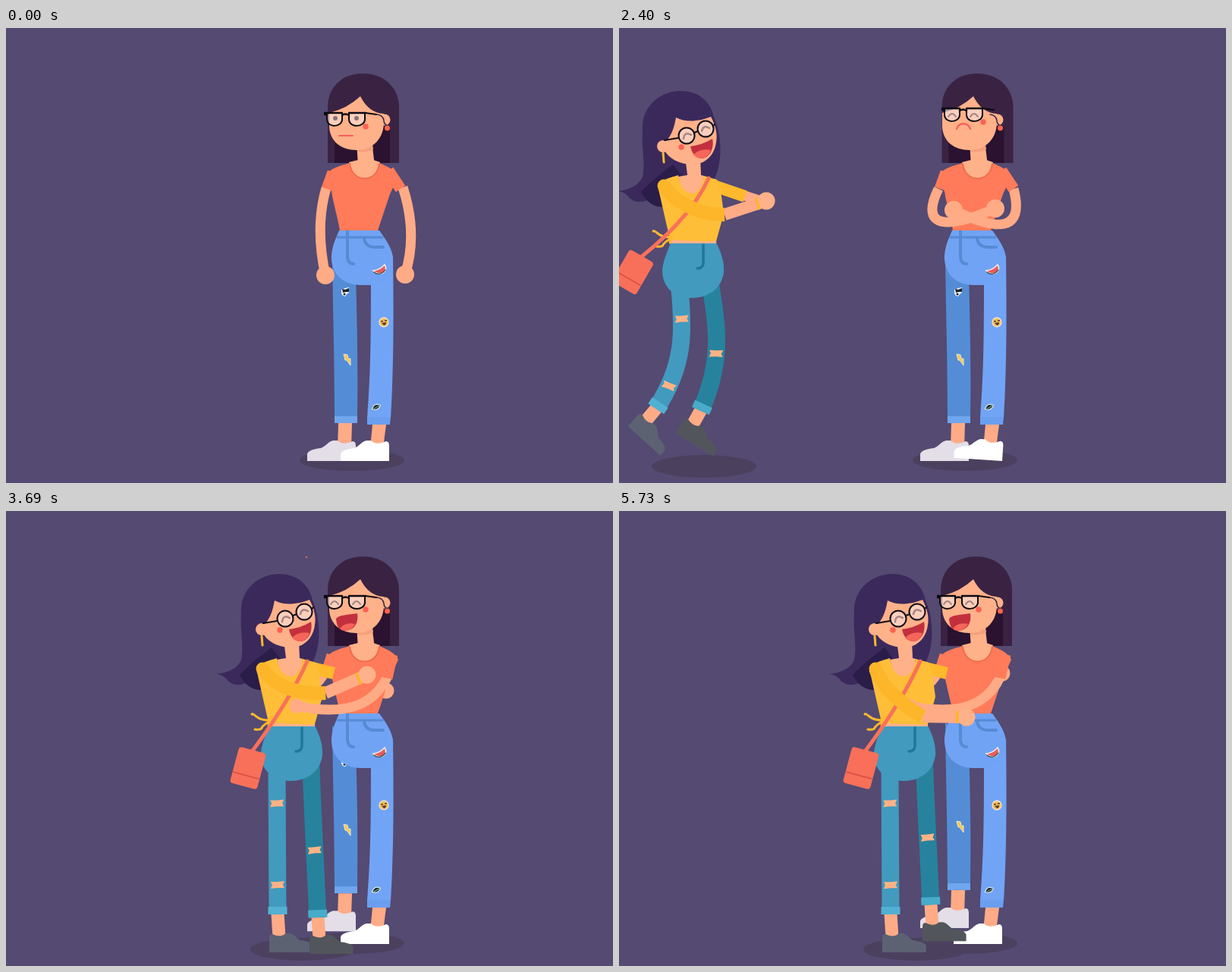
These frames come from a looping animation (800 by 600 pixels, 5760 ms). An HTML page:

```html
<!DOCTYPE html>
<html lang="en">
<head>
<meta charset="utf-8">
<title>Hug</title>
<style>
html,body{margin:0;width:100%;height:100%;overflow:hidden;background:#544a72}
svg{display:block;width:100vw;height:100vh}
.skin{fill:#ffb189}
.line{fill:none;stroke-linecap:round;stroke-linejoin:round}
.limb{fill:none;stroke:#ffab86}
</style>
</head>
<body>
<svg viewBox="0 0 800 600" preserveAspectRatio="none">
<defs>
  <path id="shoe" d="M-64 0V-9Q-63-15-46-17C-40-19-36-26-30-27H-24Q-17-20-4-26Q0-26 0-20V0Z"/>
  <path id="rip" fill="#ffb285" d="M-9-4L0-4 9-5 7 0 9 4 0 4-9 5-7 0Z"/>
  <path id="heart" fill="#ff7458" d="M0 5C-8-1-5-6-2-5Q0-4 0-2Q0-4 2-5C5-6 8-1 0 5Z"/>
</defs>
<rect width="800" height="600" fill="#544a72"/>
<ellipse cx="456" cy="570" rx="69" ry="14" fill="#4c405f"/>
<ellipse id="shadow" cx="391" cy="578" rx="69" ry="15" fill="#4c405f"/>
<circle id="farHand" r="10.5" fill="#ffab86"/>

<g id="tall">
  <g id="tallHair">
    <path fill="#3a2342" d="M424 178V105C424 76 445 60 470 60C500 60 518 80 518 105V178Z"/>
    <path fill="#2a1230" d="M433 130H506V178H433Z"/>
  </g>
  <path class="skin" d="M462 150L464 182H486L482 148Z"/>
  <g id="tallLegL">
    <path fill="#548dd6" d="M430 300L461 325C463 400 464 450 463 514H433C433 440 431 380 430 300Z"/>
    <path fill="#70a6ee" d="M433 512H463V521H433Z"/>
    <path fill="#ffab86" d="M438 521H456L455 553H437Z"/>
    <use href="#shoe" x="461" y="571" fill="#e3dee8"/>
    <g transform="translate(447 348)">
      <path fill="#f4f6f6" d="M-5-3L0-5 5-6 5 1 2 3 0 6-3 5-5 2Z"/>
      <path fill="#1d2530" d="M-4-4L0-3 5-5 5 0 1 0-3 1Z"/><circle cx="-1" cy="3" r="1.5" fill="#1d2530"/>
    </g>
    <path transform="translate(450 437)" fill="#f6c84f" stroke="#efe6d2" stroke-width="1" d="M-5-7L0-6 1-1 4-1 4 8-1 1-3 1Z"/>
  </g>
  <g id="tallLegR">
    <path fill="#72a4f6" d="M481 325C481 400 481 450 476 514H507C511 450 511 380 510 300Z"/>
    <path fill="#6a9ff0" d="M476 513H507L506 523H476Z"/>
    <path fill="#ffab86" d="M483 523H501L497 554H480Z"/>
    <use id="tapShoe" href="#shoe" fill="#fff"/>
    <circle cx="498" cy="388" r="6" fill="#f4bc55" stroke="#f2e4cc" stroke-width="1.3"/>
    <path fill="#5c3a2c" d="M494 386h3v1.500h-3zM499 385h3v1.500h-3zM495 389l6-1q0 4-3 4z"/>
    <path transform="translate(488 500) rotate(-25)" fill="#16242f" stroke="#dfe8e4" stroke-width="1.2" d="M-6 0Q0-7 6 0Q0 6-6 0Z"/>
    <path class="line" stroke="#6f9d7a" stroke-width="1.2" d="M485 502L492 498"/>
  </g>
  <path fill="#71a3f5" d="M439 267H492C505 285 511 295 510 310C509 325 503 338 480 339H466C440 338 428 320 429 300C430 285 436 275 439 267Z"/>
  <g class="line" stroke="#558bd3">
    <path stroke-width="3" d="M437 276H496"/>
    <path stroke-width="4" d="M450 268V300Q450 311 458 311M472 278Q474 289 486 289H497"/>
  </g>
  <path fill="#e75b5d" stroke="#f3ece4" stroke-width="1.5" d="M484 320Q493 319 499 312Q503 318 497 323Q490 326 484 320Z"/>
  <path class="line" stroke="#31403c" stroke-width="1.2" d="M485 322Q493 328 500 319"/>
  <path class="skin" d="M452 177L464 174H484L493 177Q492 204 472 204Q452 203 452 177Z"/>
  <path fill="#ff7b59" d="M453 178C440 182 428 184 421 195C425 205 430 215 430 222C434 240 438 255 440 267H490L505 222C508 213 511 210 517 196C512 186 503 183 492 178C490 205 455 205 453 178Z"/>
  <path class="line" stroke="#ee6c4d" stroke-width="2" d="M453 179C456 205 489 205 492 179"/>
  <path id="tallArmL" class="limb" stroke-width="13"/>
  <circle id="tallHandL" r="12" fill="#ffab86"/>
  <path id="tallSleeveL" fill="none" stroke="#ff7b59" stroke-width="15"/>
  <path fill="#f5a07c" d="M463 158L483 153 484 160Q474 165 463 163Z"/>
  <path class="skin" d="M426 112V130C427 150 442 161 462 161C484 161 498 145 498 124V113Q478 112 467 90Q450 106 426 112Z"/>
  <circle cx="499" cy="121" r="7.500" class="skin"/>
  <path class="line" stroke="#3a2342" stroke-width="1.500" d="M489 114Q497 115 498 122Q498 127 503 129"/>
  <circle cx="502.500" cy="132" r="3.500" fill="#f8634b"/>
  <g id="tallFace">
    <g fill="#f8e6e2" fill-opacity=".58" stroke="#0c0a10" stroke-width="2">
      <path d="M423 112H443V121C442 131 424 132 423 121Z"/>
      <path d="M452 112H473V121C472 131 453 132 452 121Z"/>
    </g>
    <path class="line" stroke="#0c0a10" stroke-width="2.500" d="M420 112H443M452 112H474M443 115Q447 112 452 115M420 114H423"/>
    <path class="line" stroke="#0c0a10" stroke-width="2" d="M474 112L488 114"/>
    <g id="dots" fill="#8a7576"><circle cx="434" cy="119" r="3"/><circle cx="462" cy="119" r="3"/></g>
    <path id="arcs" class="line" stroke="#a98584" stroke-width="2" d="M428 123Q433 115 438 123M457 123Q462 115 467 123"/>
    <circle cx="474" cy="130" r="3.700" fill="#fa6254"/>
    <path id="flat" class="line" stroke="#f4605c" stroke-width="2" d="M439 142H457"/>
    <path id="frown" class="line" stroke="#f4605c" stroke-width="2.300" d="M439 139C442 130 454 130 457 139"/>
    <g id="smile">
      <path fill="#c2303d" d="M435 142Q436 140 442 138Q454 136 463 135C465 148 459 157 447 158Q436 158 435 142Z"/>
      <path fill="#f5655a" d="M440 155Q447 146 460 149Q456 157 447 158Q443 158 440 155Z"/>
    </g>
  </g>
</g>

<g id="short">
  <path fill="#3b295c" d="M310 135C308 102 335 83 360 83C385 83 400 98 404 118C414 140 416 175 405 198L345 230C340 238 325 236 318 226C304 233 294 227 290 221Q285 216 278 215C292 213 306 208 310 196C314 180 308 155 310 135Z"/>
  <path fill="#2b1d49" d="M350 180Q325 198 308 216Q318 236 336 236L365 200Z"/>
  <g id="legL"></g>
  <g id="legR"></g>
  <path fill="#429abf" d="M347 283H407C414 297 418 310 417 322C414 345 395 356 375 356C350 356 335 340 336 318C338 303 343 295 347 283Z"/>
  <path class="line" stroke="#1f789b" stroke-width="3.500" d="M390 286V309Q390 317 382 317"/>
  <path id="reach" class="limb" stroke-width="13"/>
  <path id="farSleeve" fill="none" stroke="#ffb92c" stroke-width="16"/>
  <path class="skin" d="M366 170L369 194 357 196Q362 222 376 222Q390 221 391 195L387 194 386 172ZM348 276H407V284H347Z"/>
  <path fill="#ffbe38" d="M357 194C345 198 330 200 331 213L346 279Q378 282 407 281L417 245 413 215 408 200 391 195C388 226 361 226 357 194Z"/>
  <path class="line" stroke="#ffb92c" stroke-width="3" d="M348 276Q336 276 330 271T324 268M348 277Q338 283 337 286T328 288M349 272L346 283"/>
  <path class="skin" d="M338 151L343 147C350 138 352 128 354 118C368 126 388 122 400 117C406 128 409 140 407 150C405 168 392 180 376 180C358 180 344 172 338 160Z"/>
  <circle cx="337" cy="156" r="8" class="skin"/>
  <path class="line" stroke="#fbb930" stroke-width="3" d="M337 165L338 177"/>
  <g fill="#f8e6e2" fill-opacity=".58" stroke="#120d18" stroke-width="2"><circle cx="368" cy="142" r="10.500"/><circle cx="393" cy="133" r="10.500"/></g>
  <path class="line" stroke="#120d18" stroke-width="2" d="M339 148L357 145M378 138L383 136M403 129L405 127"/>
  <path class="line" stroke="#a98584" stroke-width="2.500" d="M364 146Q365 136 374 141M388 136Q390 127 398 132"/>
  <circle cx="361" cy="157" r="3.700" fill="#fa6254"/>
  <path fill="#c2303d" d="M373 156Q389 154 402 146C405 160 397 172 388 172Q376 171 373 156Z"/>
  <path fill="#f5655a" d="M377 167Q386 158 400 161Q396 172 388 172Q381 172 377 167Z"/>
</g>

<g id="hugArm">
  <path id="tallArmR" class="limb" stroke-width="13"/>
  <circle id="tallHandR" fill="#ffab86"/>
  <path id="tallSleeveR" fill="none" stroke="#ff7b59"/>
</g>

<g id="near">
  <path id="strap" class="line" stroke="#f9705a" stroke-width="5"/>
  <path id="forearm" class="limb" stroke-width="16"/>
  <circle id="nearHand" r="11.500" fill="#ffb189"/>
  <path id="bracelet" fill="none" stroke="#fdb52a" stroke-width="16"/>
  <path id="sleeve" fill="none" stroke="#fdb52a" stroke-width="18"/>
  <circle cx="338" cy="208" r="8.500" fill="#fdb52a"/>
  <g id="bag">
    <rect x="-18.500" y="-24.500" width="37" height="49" rx="4" fill="#f9705a"/>
    <path stroke="#dd5449" stroke-width="2" d="M-18 10H18"/>
  </g>
</g>
<g id="hearts"></g>
</svg>
<script>
const LOOP = 5760, STOMP = 540, TAU = Math.PI * 2;
const $ = id => document.getElementById(id);
const set = (id, attrs) => { for (const k in attrs) $(id).setAttribute(k, attrs[k]); };
const show = (id, on) => set(id, { visibility: on ? 'visible' : 'hidden' });
const clamp = v => Math.max(0, Math.min(1, v));
const ease = (t, from, to) => { const u = clamp((t - from) / (to - from)); return u * u * (3 - 2 * u); };
const mix = (a, b, k) => a.map((v, i) => v + (b[i] - v) * k);
const line = p => `M${p[0]} ${p[1]}L${p[2]} ${p[3]}`;
const cubic = p => `M${p[0]} ${p[1]}C${p.slice(2, 8).join(' ')}`;
const move = (id, x, y) => set(id, { transform: `translate(${x} ${y})` });
const place = (id, x, y) => set(id, { cx: x, cy: y });

// Arms: shoulder, two control points, hand
const ARM_L = {
  down: [422, 211, 412, 245, 412, 285, 421, 326],
  wide: [420, 211, 402, 240, 400, 280, 412, 318],
  crossed: [421, 212, 400, 255, 418, 272, 496, 238],
  hug: [424, 205, 415, 225, 405, 235, 385, 236]
};
const ARM_R = {
  down: [523, 210, 536, 250, 537, 290, 526, 325],
  wide: [525, 210, 544, 245, 546, 285, 534, 318],
  crossed: [520, 212, 530, 250, 522, 280, 441, 240],
  hug: [503, 218, 484, 258, 446, 270, 383, 257]
};
// Near arm: sleeve curve followed by the hand
const HOLD_HIGH = [338, 208, 350, 227, 380, 243, 421, 240, 476, 216];
const HOLD_LOW = [338, 208, 345, 230, 372, 255, 400, 271, 458, 272];
const REACH = [338, 208, 350, 227, 382, 247, 418, 246, 473, 228];

// Legs: hip, two control points, cuff, ankle, foot angle
const STAND_L = [357, 340, 357, 400, 358, 460, 358, 532, 360, 562, 0];
const STAND_R = [402, 335, 404, 400, 408, 470, 411, 536, 413, 564, 0];
const BACK = [358, 340, 359, 410, 347, 455, 294, 497, 274, 509, 62];
const FRONT = [400, 340, 415, 388, 433, 432, 420, 510, 415, 534, 12];
const shift = (p, dx) => p.map((v, i) => i < 10 && i % 2 === 0 ? v + dx : v);

function buildLeg(id, color, cuff, shoe, rips) {
  $(id).innerHTML = `<path class="limb" stroke-width="17"/>
    <use href="#shoe" fill="${shoe}"/>
    <path fill="none" stroke="${color}" stroke-width="23"/>
    <path fill="none" stroke="${cuff}" stroke-width="25"/>` + '<use href="#rip"/>'.repeat(rips.length);
  const [ankle, foot, leg, hem, ...holes] = $(id).children;
  return (p, lift) => {
    const [x0, y0, x1, y1, x2, y2, x, y, ax, ay, turn] = p;
    const len = Math.hypot(x - x2, y - y2), dx = (x - x2) / len, dy = (y - y2) / len;
    leg.setAttribute('d', cubic(p));
    hem.setAttribute('d', line([x - 10 * dx, y - 10 * dy, x, y]));
    ankle.setAttribute('d', line([x - dx, y - dy, ax, ay]));
    foot.setAttribute('transform', `translate(${ax} ${ay}) rotate(${turn}) translate(-13 20) scale(-.9 .93)`);
    rips.forEach((u, i) => {
      const v = 1 - u, at = (a, b, c, d) => v * v * v * a + 3 * v * v * u * b + 3 * v * u * u * c + u * u * u * d;
      const slope = (a, b, c, d) => v * v * (b - a) + 2 * v * u * (c - b) + u * u * (d - c);
      const angle = Math.atan2(-slope(x0, x1, x2, x), slope(y0, y1, y2, y)) * 360 / TAU;
      holes[i].setAttribute('transform',
        `translate(${at(x0, x1, x2, x)} ${at(y0, y1, y2, y)}) rotate(${angle})`);
    });
    move(id, 0, -lift);
  };
}
const drawLegL = buildLeg('legL', '#429abf', '#52b1d3', '#5c6272', [.252, .815]);
const drawLegR = buildLeg('legR', '#27839d', '#48abc9', '#52565c', [.56]);

// Hearts: birth time, x drift, size
const HEARTS = [[3650, -7, .8], [3790, -2, .9], [3915, 13, 1.1], [4105, -9, .75]];
$('hearts').innerHTML = '<use href="#heart"/>'.repeat(HEARTS.length);

function drawHearts(t) {
  HEARTS.forEach(([birth, drift, size], i) => {
    const age = t - birth, heart = $('hearts').children[i];
    const scale = size * clamp(age / 140) * clamp((700 - age) / 80);
    const x = 398 + drift * clamp(age / 150);
    heart.setAttribute('transform', `translate(${x} ${64 - age * .072}) scale(${age < 0 ? 0 : scale})`);
  });
}

function drawTall(t, bob, stomp, beat) {
  const wide = ease(t, 120, 380), cross = ease(t, 420, 900), hug = ease(t, 2980, 3420);
  const arm = a => mix(mix(mix(a.down, a.wide, wide), a.crossed, cross), a.hug, hug);
  const left = arm(ARM_L), right = arm(ARM_R);
  set('tallArmL', { d: cubic(left) });
  set('tallArmR', { d: cubic(right) });
  place('tallHandL', left[6], left[7]);
  place('tallHandR', right[6], right[7]);
  set('tallHandR', { r: 12 - 2.5 * hug });
  set('tallSleeveL', { d: line(mix([431, 190, 423, 212], [430, 190, 425, 206], hug)) });
  set('tallSleeveR', { d: line(mix([504, 188, 520, 212], [508, 189, 501, 220], hug)), 'stroke-width': 15 + 2 * hug });

  const look = ease(t, 450, 850) - .25 * ease(t, 2450, 2700) - .75 * ease(t, 2950, 3200);
  move('tallFace', 6 * look, -6 * look);
  move('tallHair', 1.5 * look, 0);
  const mad = t >= 600 && t < 3120, glad = t >= 3120;
  show('dots', !mad && !glad);
  show('flat', !mad && !glad);
  show('arcs', mad || glad);
  show('frown', mad);
  show('smile', glad);

  const tapping = ease(t, 700, 850) * (1 - ease(t, 2950, 3100));
  const tap = 7 * tapping * (.5 + .5 * Math.cos(TAU * (t - 1440) / 430));
  set('tapShoe', { transform: `translate(505 571) rotate(${tap})` });
  move('tallLegL', 0, -25 * stomp * Math.max(0, Math.cos(TAU * (beat - .87))));
  move('tallLegR', 0, -13 * stomp * Math.max(0, Math.sin(TAU * beat)));
  move('tall', 0, bob);
  move('hugArm', 0, bob);
}

function drawShort(t, bob, stomp, beat) {
  const here = t >= 2200;
  for (const id of ['short', 'near', 'shadow']) set(id, { display: here ? 'inline' : 'none' });
  const x = -460 * Math.pow(1 - clamp((t - 2280) / 720), 2.72);
  move('short', x, bob);
  move('near', x, bob);
  move('shadow', x, 0);

  const stride = t < 2730 ? .5 + .5 * Math.cos(TAU * (t - 2730) / 420) : 1;
  const settle = ease(t, 2730, 2990);
  const swing = Math.sin(TAU * beat);
  drawLegL(mix(mix(shift(FRONT, -41), BACK, stride), STAND_L, settle), 13 * stomp * Math.max(0, swing));
  drawLegR(mix(mix(shift(BACK, 41), FRONT, stride), STAND_R, settle), 17 * stomp * Math.max(0, -swing));

  const wave = t < 3640 ? 0 : .5 - .5 * Math.cos(TAU * (t - 3640) / 1360);
  const low = ease(wave, .25, .75);
  const reaching = 1 - ease(t, 2730, 3050);
  const near = mix(mix(HOLD_HIGH, HOLD_LOW, low), REACH, reaching);
  const [ex, ey, hx, hy] = near.slice(6);
  const along = k => [ex + (hx - ex) * k, ey + (hy - ey) * k];
  set('sleeve', { d: cubic(near) });
  set('forearm', { d: line(near.slice(6)) });
  set('bracelet', { d: line([...along(.76), ...along(.82)]) });
  place('nearHand', hx, hy);

  const far = mix([392, 204, 432, 214], [392, 204, 445, 222], reaching);
  set('farSleeve', { d: line(far) });
  set('reach', { d: line([far[2] - 4, far[3] - 2, 472, 230]) });
  show('reach', t < 3000);
  const [fx, fy] = mix([501, 237], [505, 214], low);
  place('farHand', fx, fy + bob);
  show('farHand', t > 3200);

  const [bx, by, tilt] = mix([319, 339, 15], [297, 322, 30], reaching);
  const a = tilt * TAU / 360;
  set('bag', { transform: `translate(${bx} ${by}) rotate(${tilt})` });
  set('strap', { d: `M397 198Q375 248 ${bx + 24 * Math.sin(a)} ${by - 24 * Math.cos(a)}` });
}

function draw(t) {
  const beat = (t - 3690) / STOMP;
  const stomp = ease(t, 3300, 3550);
  const bob = 3 * stomp * Math.max(0, Math.sin(TAU * beat));
  drawTall(t, bob, stomp, beat);
  drawShort(t, bob, stomp, beat);
  drawHearts(t);
}

const start = performance.now();
function tick() {
  draw((performance.now() - start) % LOOP);
  requestAnimationFrame(tick);
}
draw(0);
requestAnimationFrame(tick);
</script>
</body>
</html>
```
